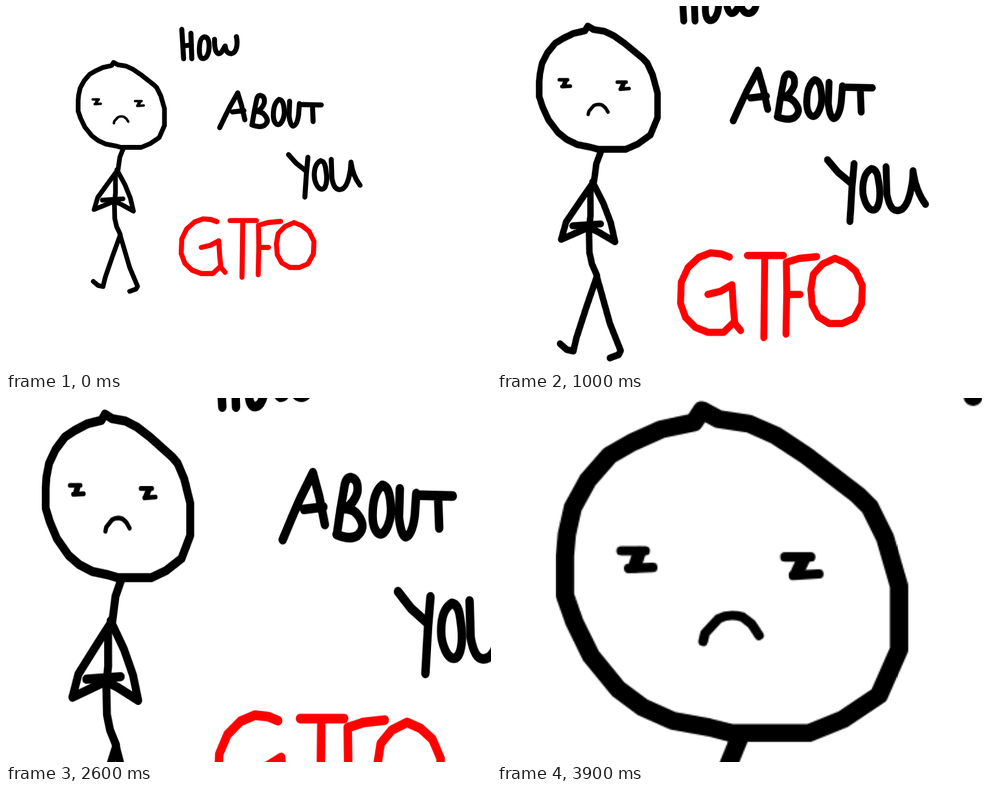
An HTML page for the animation above (4500 ms loop, 800 by 600 pixels).

```html
<!DOCTYPE html>
<html lang="en">
<head>
<meta charset="utf-8">
<title>How about you</title>
<style>
  html, body { margin: 0; width: 100%; height: 100%; overflow: hidden; background: #fff; }
  svg { display: block; width: 100%; height: 100%; }
  path { fill: none; stroke-linecap: round; stroke-linejoin: round; }
  #scene { stroke: #000; stroke-width: 7.8; transform-origin: 0 0; animation: zoom 4.5s step-end infinite; }
  #face { stroke-width: 4.1; }
  #how, #about, #you { stroke-width: 8.3; }
  #shout { stroke: #f00; stroke-width: 8.3; }

  /* hard cuts, each closer to the face */
  @keyframes zoom {
    0%      { transform: none; }
    22.222% { transform: matrix(1.37, 0, 0, 1.45, -93.3, -101.7); }
    44.444% { transform: matrix(1.675, 0, 0, 1.925, -134, -152.5); }
    66.666% { transform: matrix(3.87, 0, 0, 3.8, -348.5, -333.4); }
  }
</style>
</head>
<body>
<svg viewBox="0 0 800 600" role="img" aria-label="How about you GTFO">
  <g id="scene">
    <g id="head">
      <path d="M177.4 93 174 98.3 159.8 101.4 148.2 106.7 137.9 112.7 128.8 123.3 122.4 135.1 119.8 146.9 119 156.2V173.3L123.1 185.1 130.1 199.6 141.7 214 152.1 221.9 165 227.7 180.5 230.6 189.5 233H223.1L237.3 227.2 252.8 216.7 261.4 196.9V169.3L255.4 148.3 249 135.1 243.8 129.8 221.8 112.7 208.9 104 197.3 98.8 184.4 96.9Z"/>
    </g>

    <g id="face">
      <path d="M143 154H153.2M146.2 161.7 156.4 161.2"/>
      <path d="M150.6 155 148.8 160.6" stroke-width="5.6"/>
      <path d="M212.8 156.7H223.7M216.4 164.7 227.2 164"/>
      <path d="M220.6 157.8 218 163.4" stroke-width="5.6"/>
      <path d="M177.9 193.3 178.7 189.8 184.4 183.5Q188.8 181 194.7 182.7L198.6 185.8 201.7 190.7"/>
    </g>

    <g id="body">
      <path d="M193.4 235 187.8 249 184.8 269.9 180.5 277.7 180.6 308.8 178.8 324.4 179.4 350.4 182.4 363.4 188.4 376.4V381"/>
      <path d="M183 272 169.3 290.6 151.3 315.6 145.4 335.5 160.3 329.3 178.2 321.8 190.1 327 210.2 338.2 205.1 316.6 196.1 294.3 183 270"/>
      <path d="M159 320 193 317.8"/>
      <path d="M187.5 380 175.5 413 163.8 447 160 462.5 152 460.7 144 454"/>
      <path d="M188 377 192.5 392 204 431 217 462 214.6 466.5 204 470.3"/>
    </g>

    <g id="how">
      <path d="M290 38.5 293 87M305 45 306.5 87M292 66 306 64"/>
      <path d="M327 51C320 52 319 64 319 73S321 87 326 86.5 335 78 335 67 333 51 327 51"/>
      <path d="M344 55Q343.5 76 350 78.5C356 79 358 71 361.5 66 362 74 366 79 372 78.5 380 77 383 64 380 50.5"/>
    </g>

    <g id="about">
      <path d="M352.5 200.5 360.3 184.2 369.3 166 382.2 143.2 388.4 163.4 394 187.5M373.4 174.6 392.5 172.5"/>
      <path d="M406 195 409.5 174 413.5 154Q415 147 420 147.5 427.5 149 426 160 423 169 414 174 424 174 429 183 434 191 426 197 418 201 405.5 196"/>
      <path d="M450.5 154C443 159 441 170 441 180S445 196 449.5 195.5 460 184 459 172 456 155 450.5 154"/>
      <path d="M467.8 157 467 181.6Q469 197 473.5 198 480 197 482.5 180L484 161"/>
      <path d="M488 162.5 520 163.2M505.5 164 506.6 190.5"/>
    </g>

    <g id="you">
      <path d="M466 245 478.5 259 495.6 272.5M498 249.5 495.6 275 493 315"/>
      <path d="M519 255C511 259 508.5 269 508.5 279S514 302 521 302 530 288 528.5 276 526 256 519 255"/>
      <path d="M536.5 253 537.5 284Q541 302 549 302.5 560 304 565.5 283 569 270 569 257.5 572 280 584 295.5"/>
    </g>

    <g id="shout">
      <path d="M348 355.5 338 352 325 350.8 311 356 298 367.5 290 384 289 408 295 424 307 435.5 322 441H341L353 430"/>
      <path d="M322 398 337 394.5 351 387 352.5 412 354.5 431 361.5 439"/>
      <path d="M369.5 353.7H413M390.5 355 390 400 389.3 447"/>
      <path d="M453 355 432 357 416.5 361.5 417 395 416 443M418 398H433"/>
      <path d="M475 357 460 363.5 449 375 446 392 447.5 410 455 423.5 468 431H484L498 425 507 409 508 388 500 371.5 488 362Z"/>
    </g>
  </g>
</svg>
</body>
</html>
```
